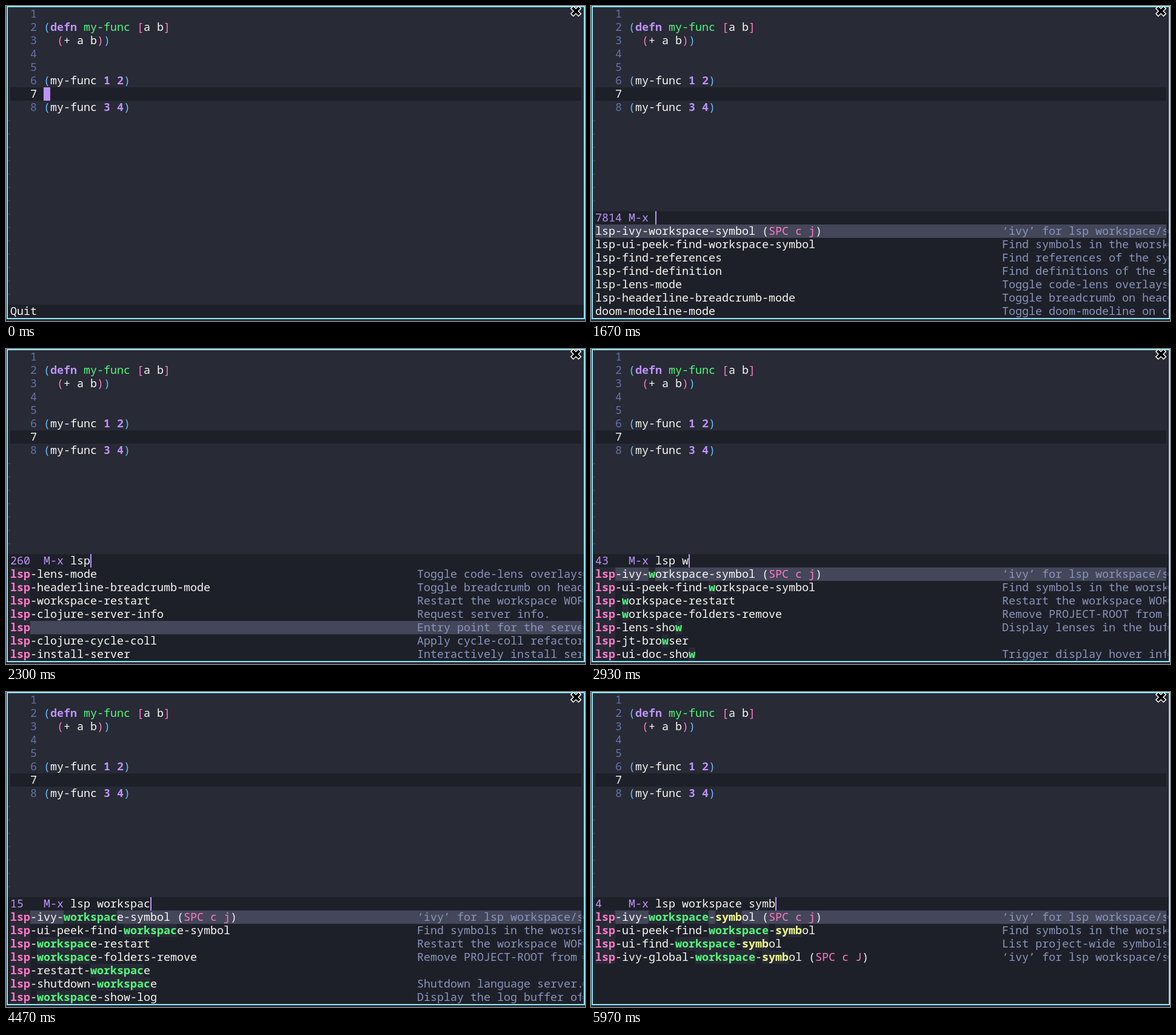
Write an HTML page with a canvas that moves like this. It is 955x519 px and loops after 8000 ms.

```html
<!DOCTYPE html>
<html lang="en">
<head>
<meta charset="utf-8">
<title>Editor command palette</title>
<style>
  html, body { margin: 0; width: 100%; height: 100%; overflow: hidden; background: #282a36; }
  canvas { display: block; }
</style>
</head>
<body>
<canvas id="stage" width="955" height="519"></canvas>
<script>
const ctx = document.getElementById('stage').getContext('2d');

const LOOP = 8000, CELL = 11, ROW = 22, LEFT = 7, RIGHT = 949;
const PANEL_TOP = 338, ECHO_TOP = 492, DESC_COL = 61;
const C = {
  bg: '#282a36', dark: '#1e2029', fg: '#f8f8f2', select: '#44475a', dim: '#6272a4',
  doc: '#8995bb', fringe: '#565761', border: '#8be9fd', violet: '#bd93f9',
  pink: '#ff79c6', green: '#50fa7b', yellow: '#f1fa8c', blue: '#61bfff'
};
const MATCH_COLORS = [C.pink, C.green, C.yellow];

// Runs: [text, color, bold]
const call = (a, b) => [['(', C.blue], ['my-func ', C.fg], [a, C.violet, true], [' ', C.fg],
                        [b, C.violet, true], [')', C.blue]];
const source = [
  [],
  [['(', C.blue], ['defn', C.violet, true], [' my-func ', C.green], ['[', C.pink], ['a b', C.fg], [']', C.pink]],
  [['  ', C.fg], ['(', C.pink], ['+ a b', C.fg], [')', C.pink], [')', C.blue]],
  [], [],
  call('1', '2'),
  [],
  call('3', '4')
];
const CURRENT_LINE = 6;

const docs = {
  'lsp-ivy-workspace-symbol (SPC c j)': '‘ivy’ for lsp workspace/s',
  'lsp-ivy-global-workspace-symbol (SPC c J)': '‘ivy’ for lsp workspace/s',
  'lsp-ui-peek-find-workspace-symbol': 'Find symbols in the worsk',
  'lsp-ui-find-workspace-symbol': 'List project-wide symbols',
  'lsp-find-references': 'Find references of the sy',
  'lsp-find-definition': 'Find definitions of the s',
  'lsp-lens-mode': 'Toggle code-lens overlays',
  'lsp-headerline-breadcrumb-mode': 'Toggle breadcrumb on head',
  'doom-modeline-mode': 'Toggle doom-modeline on c',
  'lsp-workspace-restart': 'Restart the workspace WOR',
  'lsp-clojure-server-info': 'Request server info.',
  'lsp': 'Entry point for the serve',
  'lsp-clojure-cycle-coll': 'Apply cycle-coll refactor',
  'lsp-install-server': 'Interactively install ser',
  'lsp-workspace-folders-remove': 'Remove PROJECT-ROOT from ',
  'lsp-lens-show': 'Display lenses in the buf',
  'lsp-ui-doc-show': 'Trigger display hover inf',
  'lsp-shutdown-workspace': 'Shutdown language server.',
  'lsp-workspace-show-log': 'Display the log buffer of'
};

const ivySymbol = 'lsp-ivy-workspace-symbol (SPC c j)';
const peekSymbol = 'lsp-ui-peek-find-workspace-symbol';
const lists = {
  recent: [ivySymbol, peekSymbol, 'lsp-find-references', 'lsp-find-definition', 'lsp-lens-mode',
           'lsp-headerline-breadcrumb-mode', 'doom-modeline-mode'],
  lsp: ['lsp-lens-mode', 'lsp-headerline-breadcrumb-mode', 'lsp-workspace-restart',
        'lsp-clojure-server-info', 'lsp', 'lsp-clojure-cycle-coll', 'lsp-install-server'],
  w: [ivySymbol, peekSymbol, 'lsp-workspace-restart', 'lsp-workspace-folders-remove',
      'lsp-lens-show', 'lsp-jt-browser', 'lsp-ui-doc-show'],
  workspace: [ivySymbol, peekSymbol, 'lsp-workspace-restart', 'lsp-workspace-folders-remove',
              'lsp-restart-workspace', 'lsp-shutdown-workspace', 'lsp-workspace-show-log'],
  symbol: [ivySymbol, peekSymbol, 'lsp-ui-find-workspace-symbol',
           'lsp-ivy-global-workspace-symbol (SPC c J)']
};

const prompt = (at, input, count, list, selected = 0) => ({ at, input, count, list: lists[list], selected });
const timeline = [
  { at: 0, echo: 'Quit' },
  { at: 1330, echo: 'SPC-' },
  { at: 1500, echo: 'SPC :' },
  prompt(1670, '', 7814, 'recent'),
  prompt(2130, 'l', 5635, 'recent'),
  prompt(2300, 'lsp', 260, 'lsp', 4),
  prompt(2770, 'lsp ', 260, 'lsp', 4),
  prompt(2930, 'lsp w', 43, 'w'),
  prompt(3130, 'lsp wo', 15, 'workspace'),
  prompt(3330, 'lsp work', 15, 'workspace'),
  prompt(3530, 'lsp worksp', 15, 'workspace'),
  prompt(4100, 'lsp workspa', 15, 'workspace'),
  prompt(4470, 'lsp workspac', 15, 'workspace'),
  prompt(5730, 'lsp workspace', 15, 'workspace'),
  prompt(5970, 'lsp workspace symb', 4, 'symbol')
];

function rect(x, y, w, h, color) {
  ctx.fillStyle = color;
  ctx.fillRect(x, y, w, h);
}

// Places each character in its terminal cell.
function text(str, col, top, color, bold) {
  ctx.font = `${bold ? 'bold ' : ''}18.333px "Noto Sans Mono", monospace`;
  ctx.fillStyle = color;
  [...str].forEach((ch, i) => ctx.fillText(ch, LEFT + (col + i) * CELL, top + 17));
}

function drawSource(showCursor) {
  rect(LEFT, 2 + CURRENT_LINE * ROW, RIGHT - LEFT, ROW, C.dark);
  source.forEach((runs, i) => {
    const top = 2 + i * ROW;
    text(String(i + 1), 3, top, i === CURRENT_LINE ? C.fg : C.dim);
    let col = 5;
    for (const [str, color, bold] of runs) {
      text(str, col, top, color, bold);
      col += str.length;
    }
  });
  if (showCursor) rect(LEFT + 5 * CELL, 2 + CURRENT_LINE * ROW, CELL, ROW, C.violet);
}

function drawTildes() {
  ctx.strokeStyle = C.fringe;
  ctx.lineWidth = 1;
  for (let y = 188.5; y < 480; y += ROW) {
    ctx.beginPath();
    ctx.moveTo(3.5, y + 2);
    ctx.lineTo(3.5, y + 1);
    ctx.lineTo(4.5, y);
    ctx.lineTo(6, y);
    ctx.lineTo(7, y + 1);
    ctx.stroke();
  }
}

function drawCandidate(label, words, top, selected) {
  if (selected) rect(LEFT, top, RIGHT - LEFT, ROW, C.select);
  text(label, 0, top, C.fg);
  const key = label.match(/\((.*)\)/);
  const background = selected ? C.select : C.dark;
  const repaint = (str, col, color, fill, bold) => {
    rect(LEFT + col * CELL, top, str.length * CELL, ROW, fill);
    text(str, col, top, color, bold);
  };
  if (key) repaint(key[1], key.index + 1, C.pink, background);

  let from = 0;
  words.forEach((word, i) => {
    const col = label.indexOf(word, from);
    repaint(word, col, MATCH_COLORS[i], C.bg, true);
    from = col + word.length;
  });

  const doc = docs[label] || '';
  ctx.save();
  ctx.beginPath();
  ctx.rect(LEFT, top, RIGHT - LEFT, ROW);
  ctx.clip();
  text(doc, DESC_COL, top, C.doc);
  ctx.restore();
  if (doc.length > 24) {
    rect(950, top + 9, 3, 1, C.fringe);
    rect(950, top + 12, 3, 1, C.fringe);
  }
}

function drawPrompt({ input, count, list, selected }) {
  rect(3, PANEL_TOP, 950, 514 - PANEL_TOP, C.dark);
  text(String(count).padEnd(5) + 'M-x', 0, PANEL_TOP, C.violet);
  text(input, 9, PANEL_TOP, C.fg);
  rect(LEFT + (9 + input.length) * CELL, PANEL_TOP, 2, ROW, C.violet);
  const words = input.split(' ').filter(Boolean);
  list.forEach((label, i) => drawCandidate(label, words, PANEL_TOP + (i + 1) * ROW, i === selected));
}

function drawPointer() {
  ctx.lineCap = 'butt';
  for (const [color, width, reach] of [['#fff', 7, 8], ['#000', 4.4, 6.7]]) {
    ctx.strokeStyle = color;
    ctx.lineWidth = width;
    const d = reach * 0.85;
    ctx.beginPath();
    ctx.moveTo(940 - d, 8.5 - d);
    ctx.lineTo(940 + d, 8.5 + d);
    ctx.moveTo(940 + d, 8.5 - d);
    ctx.lineTo(940 - d, 8.5 + d);
    ctx.stroke();
  }
}

function draw(time) {
  const state = timeline.findLast(step => step.at <= time);
  rect(0, 0, 955, 519, C.bg);
  drawTildes();
  drawSource('echo' in state);
  if ('echo' in state) {
    rect(3, ECHO_TOP, 950, ROW, C.dark);
    text(state.echo, 0, ECHO_TOP, C.fg);
  } else {
    drawPrompt(state);
  }
  ctx.strokeStyle = C.border;
  ctx.lineWidth = 2;
  ctx.strokeRect(2, 1, 952, 514);
  drawPointer();
}

const start = performance.now();
function frame() {
  draw((performance.now() - start) % LOOP);
  requestAnimationFrame(frame);
}
frame();
</script>
</body>
</html>
```
